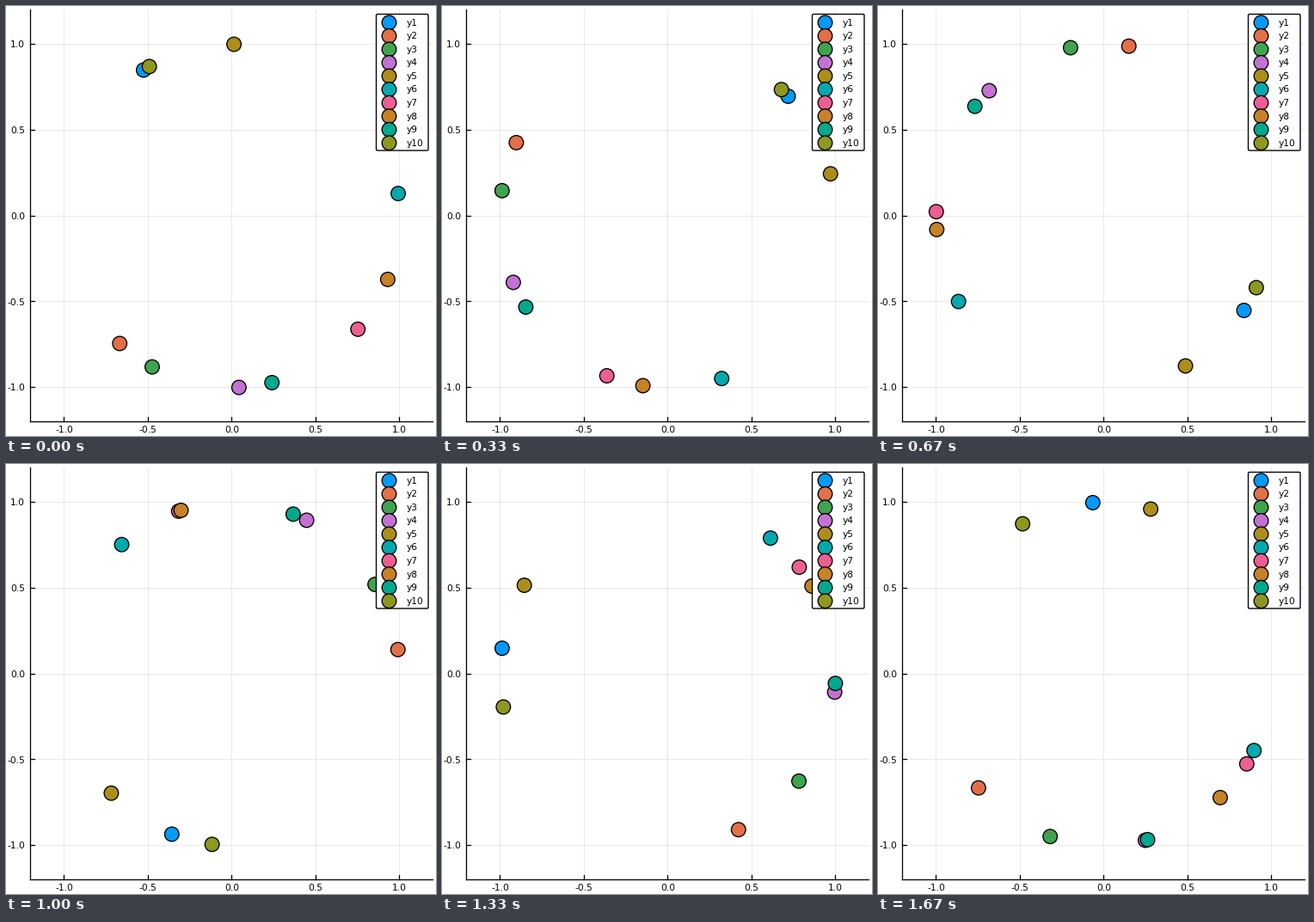
Write a matplotlib script that moves like this. It is 500 by 500 pixels and loops after 1840 ms.

```python
import numpy as np
import matplotlib.pyplot as plt
from matplotlib.animation import FuncAnimation
from matplotlib.patches import Circle, FancyBboxPatch

SIZE, DPI = 500, 100
PT = 72 / DPI                      # points per pixel
CX, CY, SX, SY = 262.2, 243.6, 195.0, 199.6
LEFT, RIGHT, TOP, BOTTOM = 28, 496, 4, 483
TICK, RADIUS, EDGE = 5, 8.3, 1.35
TICKS = np.arange(-1, 1.01, 0.5)
FPS, STEPS, TICK_MS = 6, 11, 10
LOOP_MS = 1840

COLORS = ["#009afa", "#e36f47", "#3ea44e", "#c371d2", "#ac8e18",
          "#00aaae", "#ed5e93", "#c68225", "#00a98d", "#8e971e"]

# each dot circles clockwise at its own constant speed (degrees, degrees per step)
START = np.array([121.8, 228, 241.6, 272.4, 89.3, 7.5, -41.3, -21.7, -76.2, 119.5])
SPEED = np.array([38.8, 36.64, 35.03, 34.81, 37.55, 39.4, 35.03, 38.44, 35.87, 36.05])

fig = plt.figure(figsize=(SIZE / DPI, SIZE / DPI), dpi=DPI, facecolor="white")
ax = fig.add_axes([0, 0, 1, 1])
ax.set_xlim(0, SIZE)
ax.set_ylim(SIZE, 0)
ax.axis("off")


def line(xs, ys, width=1.3, z=2, **kw):
    ax.plot(xs, ys, color="black", lw=width * PT, zorder=z, **kw)


def label(x, y, text, align, z=2):
    ax.text(x, y, text, ha=align, va="baseline", family="DejaVu Sans",
            size=10.67 * PT, color="black", zorder=z)


def dot(x, y, color, z):
    return ax.add_patch(Circle((x, y), RADIUS, fc=color, ec="black",
                               lw=EDGE * PT, zorder=z))


def draw_axes():
    for v in TICKS:
        x, y = CX + v * SX, CY - v * SY
        line([x, x], [TOP, BOTTOM], 0.9, 1, alpha=0.09)
        line([LEFT, RIGHT], [y, y], 0.9, 1, alpha=0.09)
        line([x, x], [BOTTOM, BOTTOM - TICK])
        line([LEFT, LEFT + TICK], [y, y])
        label(x + 0.3, 496.3, f"{v:.1f}", "center")
        label(22, y + 4.2, f"{v:.1f}", "right")
    line([LEFT, LEFT], [TOP, BOTTOM])
    line([LEFT, RIGHT], [BOTTOM, BOTTOM])


def draw_legend():
    ax.add_patch(FancyBboxPatch((430.5, 9.5), 60.5, 158.5, fc="white", ec="black",
                                boxstyle="round,pad=0,rounding_size=1.5",
                                lw=EDGE * PT, zorder=20))
    for i, color in enumerate(COLORS):
        y = 19.3 + 15.55 * i
        dot(445.5, y, color, 21)
        label(465.5, y + 3.4, f"y{i + 1}", "left", 22)


draw_axes()
draw_legend()
dots = [dot(CX, CY, color, 5 + i) for i, color in enumerate(COLORS)]


def update(frame):
    # the picture jumps six times a second
    step = min(int((frame + 0.5) * TICK_MS * FPS / 1000), STEPS - 1)
    angles = np.radians(START - SPEED * step)
    for d, a in zip(dots, angles):
        # half a pixel puts the centre in the middle of its pixel
        d.center = CX + 0.5 + SX * np.cos(a), CY + 0.5 - SY * np.sin(a)
    return dots


anim = FuncAnimation(fig, update, frames=LOOP_MS // TICK_MS, interval=TICK_MS,
                     repeat=True, repeat_delay=0, blit=False)
plt.show()
```
